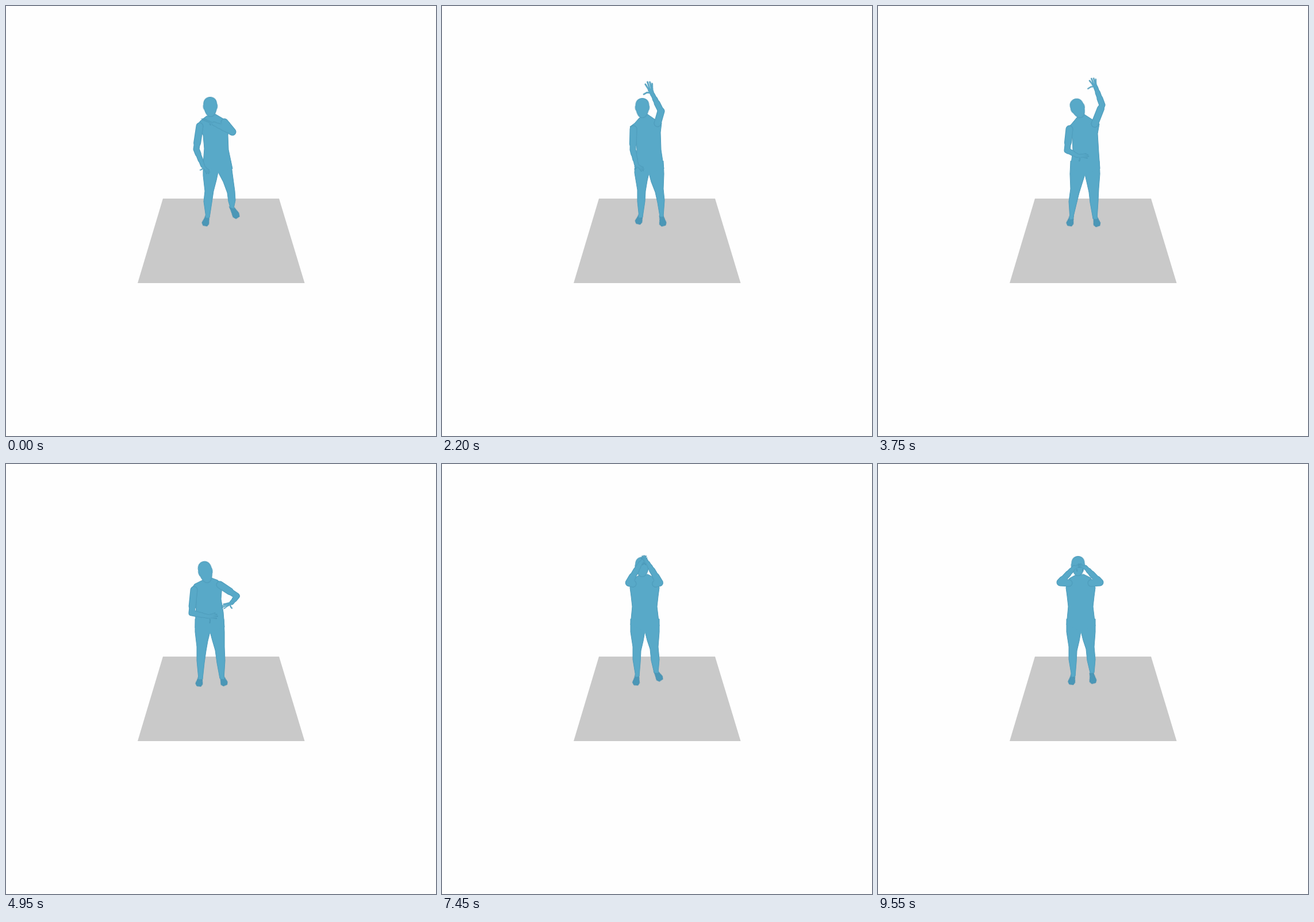
Recreate the animation shown at these times as an HTML page without scripts. Size 748 by 748 pixels, loop 9600 ms.

```html
<!DOCTYPE html>
<html lang="en">
<head>
<meta charset="utf-8">
<title>Gesturing figure</title>
<style>
html, body { margin: 0; width: 100%; height: 100%; overflow: hidden; background: #fefefe; }
svg { display: block; width: 100%; height: 100%; }

.part { animation: 9.6s linear infinite; }
.skin { fill: #58a9c8; stroke: #58a9c8; stroke-linejoin: round; stroke-linecap: round; }
.limb { fill: none; }
.fingers { fill: none; stroke-width: 2.7; }
.foot { fill: #4b97b7; stroke: #4b97b7; }

/* each arm is one line, thinned towards the wrist by stacked dashes */
.w1 { stroke-width: 8; }
.w2 { stroke-width: 9.5; stroke-dasharray: 86 200; }
.w3 { stroke-width: 11; stroke-dasharray: 70 200; }
.w4 { stroke-width: 13; stroke-dasharray: 42 200; }

.head { animation-name: head; }
.torso { animation-name: torso; }
.leg-l { animation-name: leg-l; }
.leg-r { animation-name: leg-r; }
.foot-l { animation-name: foot-l; }
.foot-r { animation-name: foot-r; }
.arm-l { animation-name: arm-l; }
.arm-r { animation-name: arm-r; }
.hand-l { animation-name: hand-l; }
.hand-r { animation-name: hand-r; }

@keyframes head {
  0% { transform: translate(355.5px, 175px) rotate(-3deg) scale(1, 1); }
  22.92% { transform: translate(348.5px, 177px) rotate(0deg) scale(1, 1); }
  39.06% { transform: translate(347.5px, 177.5px) rotate(-22deg) scale(1, 1); }
  51.56% { transform: translate(347px, 187.5px) rotate(-13deg) scale(1, 1.1); }
  65.1% { transform: translate(348.5px, 180px) rotate(0deg) scale(1.05, 1); }
  90.1%, 100% { transform: translate(348px, 177px) rotate(0deg) scale(.97, 1); }
}

@keyframes torso {
  0% { d: path("M348 192L338 200 332 208 343 225 345 248 343 275 368 289 394 283 387 250 386 225 389 203 376 195 364 188Z"); }
  22.92% { d: path("M343 195L335 204 327 210 337 228 339 250 335 280 360 291 386 283 381 250 380 220 382 203 370 197 357 188Z"); }
  39.06% { d: path("M346 194L336 206 329 212 338 230 339 250 335 282 360 293 386 283 384 255 382 222 385 205 372 197 358 188Z"); }
  51.56% { d: path("M340 203L328 209 322 218 331 240 330 262 329 285 355 292 380 284 378 258 374 235 376 209 368 202 357 198Z"); }
  65.1%, 100% { d: path("M342 194L333 199 327 215 329 230 331 248 328 280 353 291 378 282 374 248 376 230 378 215 370 198 358 192Z"); }
}

@keyframes leg-l {
  0% { d: path("M343 270L343 295 346 322 344 340 348 368 354 368 358 342 361 322 366 303 369 289 369 270Z"); }
  22.92% { d: path("M336 270L335 290 340 320 340 340 343 368 349 367 353 340 354 322 357 304 360 291 360 270Z"); }
  39.06% { d: path("M335 270L334 292 335 318 332 340 334 371 339 370 345 345 350 325 355 309 360 293 360 270Z"); }
  51.56% { d: path("M329 270L329 292 332 318 332 342 335 374 342 374 345 346 348 325 351 308 355 292 355 270Z"); }
  65.1%, 100% { d: path("M328 270L328 292 332 318 332 340 337 370 343 369 345 345 346 325 350 308 353 291 353 270Z"); }
}

@keyframes leg-r {
  0% { d: path("M391 270L395 300 398 322 399 338 396 352 390 350 387 340 385 325 378 306 369 289 366 270Z"); }
  22.92% { d: path("M385 270L386 292 385 318 387 338 385 366 379 366 375 342 371 324 364 306 360 291 357 270Z"); }
  39.06% { d: path("M385 270L386 292 384 318 383 340 381 370 374 370 369 342 367 324 363 306 360 293 357 270Z"); }
  51.56% { d: path("M379 270L380 292 380 318 381 342 379 374 372 373 367 346 364 324 359 307 355 292 352 270Z"); }
  65.1%, 100% { d: path("M378 270L378 292 376 318 378 340 376 363 369 363 364 342 362 322 357 307 353 291 350 270Z"); }
}

@keyframes foot-l {
  0% { transform: translate(350px, 367px) rotate(16deg); }
  22.92% { transform: translate(345.5px, 364px) rotate(18deg); }
  39.06% { transform: translate(336.5px, 367px) rotate(14deg); }
  51.56% { transform: translate(338px, 371px) rotate(11deg); }
  65.1% { transform: translate(339.5px, 370px) rotate(6deg); }
  90.1%, 100% { transform: translate(339px, 368px) rotate(12deg); }
}

@keyframes foot-r {
  0% { transform: translate(393px, 351px) rotate(-29deg) scale(1, 1.25); }
  22.92% { transform: translate(382px, 367px) rotate(-11deg) scale(1, 1); }
  39.06% { transform: translate(378px, 368px) rotate(-15deg) scale(1, 1); }
  51.56% { transform: translate(376px, 371px) rotate(-19deg) scale(1, .95); }
  65.1% { transform: translate(373px, 361px) rotate(-34deg) scale(1, 1.05); }
  90.1% { transform: translate(372px, 363px) rotate(-24deg) scale(1, 1.05); }
  99.48%, 100% { transform: translate(372px, 366px) rotate(-10deg) scale(1, 1); }
}

@keyframes arm-l {
  0% { d: path("M337 209L331 249 342 277"); }
  22.92% { d: path("M333 214L332 250 338 275"); }
  30.2% { d: path("M331 214L322 249 340 264"); }
  39.06% { d: path("M333 214L329 251 346 260"); }
  51.56% { d: path("M327 219L323 259 350 265"); }
  55.73% { d: path("M329 215L318 240 338 215"); }
  59.9%, 70.31%, 81.25%, 92.19%, 99.48%, 100% { d: path("M332 207L317 206 341 180"); }
  65.1%, 75.52%, 85.94%, 95.83% { d: path("M332 209L330 207 347 169"); }
}

@keyframes hand-l {
  0% { transform: translate(342px, 277px) rotate(142deg) scale(.6, .75); }
  22.92% { transform: translate(338px, 275px) rotate(132deg) scale(.6, .7); }
  30.2% { transform: translate(340px, 264px) rotate(105deg) scale(.6, .8); }
  39.06% { transform: translate(346px, 260px) rotate(93deg) scale(.65, .85); }
  51.56% { transform: translate(350px, 265px) rotate(88deg) scale(.8, .75); }
  55.73% { transform: translate(338px, 215px) rotate(60deg) scale(.6, .65); }
  59.9%, 70.31%, 81.25%, 92.19%, 99.48%, 100% { transform: translate(341px, 180px) rotate(72deg) scale(.55, .55); }
  65.1%, 75.52%, 85.94%, 95.83% { transform: translate(347px, 168px) rotate(20deg) scale(.7, .75); }
}

@keyframes arm-r {
  0% { d: path("M380 202L394 219 362 205"); }
  5.21% { d: path("M379 203L404 214 408 185"); }
  10.42% { d: path("M378 203L403 193 417 164"); }
  16.67% { d: path("M376 203L392 181 389 147"); }
  22.92% { d: path("M375 204L381 183 367 155"); }
  32.29% { d: path("M377 205L391 173 385 136"); }
  39.06% { d: path("M377 205L390 172 379 142"); }
  45.31% { d: path("M376 206L402 200 390 172"); }
  51.56% { d: path("M372 210L402 230 393 241"); }
  55.73% { d: path("M372 209L402 222 373 210"); }
  59.9%, 70.31%, 81.25%, 92.19%, 99.48%, 100% { d: path("M371 207L386 206 361 180"); }
  65.1%, 75.52%, 85.94%, 95.83% { d: path("M372 209L374 207 357 169"); }
}

@keyframes hand-r {
  0% { transform: translate(362px, 205px) rotate(-68deg) scale(.3, 1); }
  5.21% { transform: translate(408px, 185px) rotate(0deg) scale(.7, 1); }
  10.42% { transform: translate(417px, 164px) rotate(35deg) scale(1, 1); }
  16.67% { transform: translate(389px, 147px) rotate(5deg) scale(1, 1); }
  22.92% { transform: translate(366px, 154px) rotate(-20deg) scale(1, 1); }
  32.29% { transform: translate(385px, 136px) rotate(-8deg) scale(1, 1); }
  39.06% { transform: translate(379px, 142px) rotate(-24deg) scale(.95, .75); }
  45.31% { transform: translate(390px, 172px) rotate(-45deg) scale(.8, .9); }
  51.56% { transform: translate(393px, 241px) rotate(-116deg) scale(.65, .8); }
  55.73% { transform: translate(373px, 210px) rotate(-80deg) scale(.6, .65); }
  59.9%, 70.31%, 81.25%, 92.19%, 99.48%, 100% { transform: translate(361px, 180px) rotate(-72deg) scale(.55, .55); }
  65.1%, 75.52%, 85.94%, 95.83% { transform: translate(357px, 168px) rotate(-20deg) scale(.7, .75); }
}
</style>
</head>
<body>
<svg viewBox="0 0 748 748">
  <defs>
    <!-- soft darker rim just inside the silhouette -->
    <filter id="rim" filterUnits="userSpaceOnUse" x="290" y="90" width="170" height="310" color-interpolation-filters="sRGB">
      <feGaussianBlur in="SourceAlpha" stdDeviation="1.3" result="soft"/>
      <feFlood flood-color="#357f9f" flood-opacity=".75"/>
      <feComposite operator="out" in2="soft"/>
      <feComposite operator="atop" in2="SourceGraphic"/>
    </filter>
    <g id="hand">
      <path d="M-3 1L-4.500-10 4-10.500 3 1Z"/>
      <path class="fingers" d="M-3-10L-5.400-21M-1-11L-.6-23.500M2-11L3.200-22M3-9L6-18M-2-4L-8-6.500-14-5.500"/>
    </g>
    <path id="foot" d="M-3-3L3-3 4.500 5 6 11 4 15.500-3 16-6 12-4 4Z"/>
  </defs>

  <path fill="#c9c9c9" d="M273 335H475L519.500 482H229Z"/>

  <g class="skin" filter="url(#rim)">
    <g class="part foot-l"><use href="#foot" class="foot"/></g>
    <g class="part foot-r"><use href="#foot" class="foot"/></g>
    <path class="part leg-l"/>
    <path class="part leg-r"/>
    <path class="part torso"/>
  </g>

  <g class="skin" filter="url(#rim)">
    <g class="part head">
      <path stroke="none" d="M-12-4C-12-12-7-17 0-17S12-12 12-4C13-3 13 3 11 5 9 12 6 18 0 18S-9 12-11 5C-13 3-13-3-12-4Z"/>
    </g>
  </g>

  <g class="skin" filter="url(#rim)">
    <path class="part limb arm-l w1" pathLength="100"/>
    <path class="part limb arm-l w2" pathLength="100"/>
    <path class="part limb arm-l w3" pathLength="100"/>
    <path class="part limb arm-l w4" pathLength="100"/>
    <g class="part hand-l"><use href="#hand" transform="scale(-1 1)"/></g>
  </g>

  <g class="skin" filter="url(#rim)">
    <path class="part limb arm-r w1" pathLength="100"/>
    <path class="part limb arm-r w2" pathLength="100"/>
    <path class="part limb arm-r w3" pathLength="100"/>
    <path class="part limb arm-r w4" pathLength="100"/>
    <g class="part hand-r"><use href="#hand"/></g>
  </g>
</svg>
</body>
</html>
```
